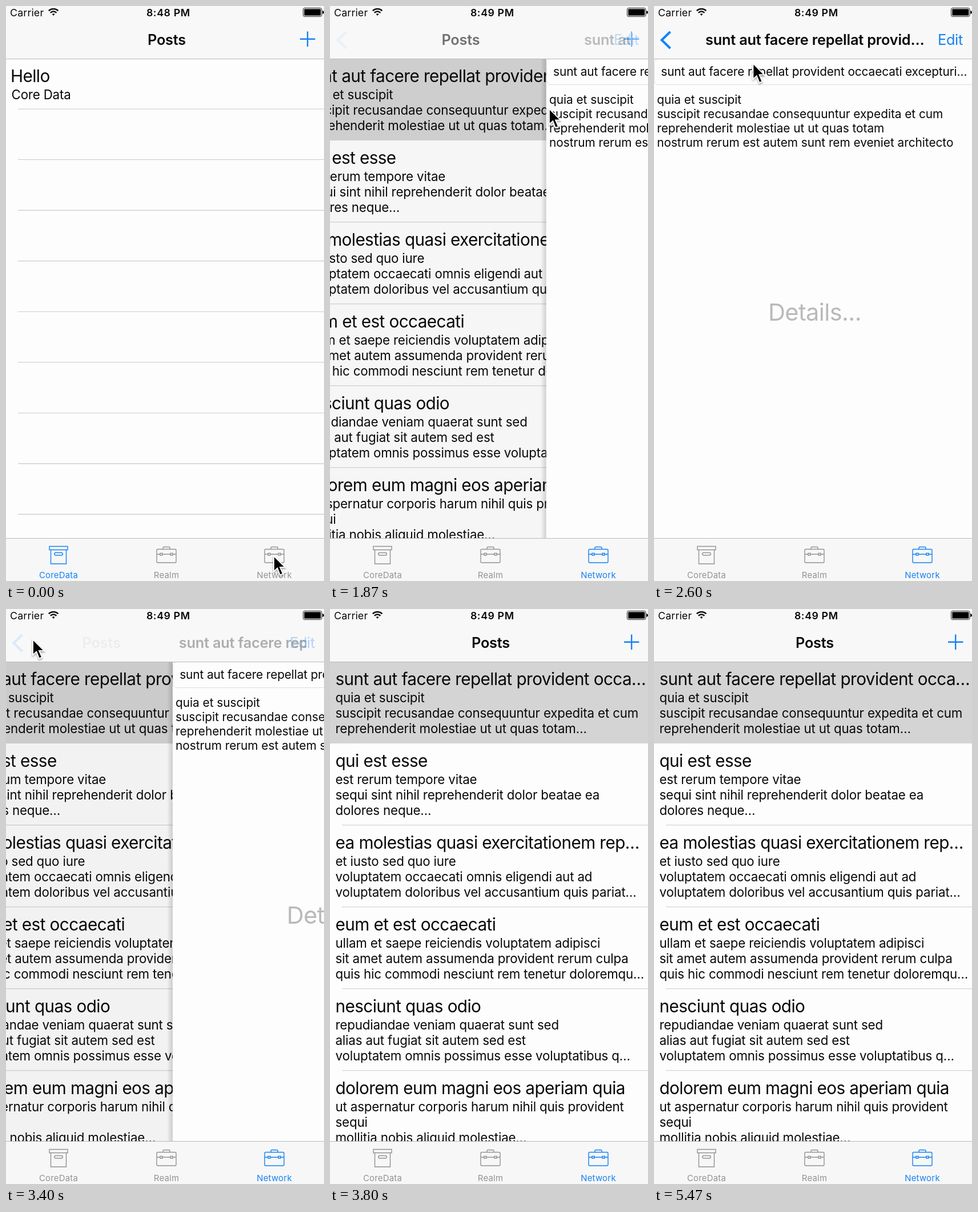
An HTML page that plays this animation: 557x1005 px, repeating every 5.54 s.

```html
<!DOCTYPE html>
<html lang="en">
<head>
<meta charset="utf-8">
<title>Posts</title>
<style>
  html, body { margin: 0; width: 100%; height: 100%; overflow: hidden; background: #fdfdfd; }
  svg { display: block; width: 100%; height: 100%; }
  text { font-family: Inter, "Open Sans", sans-serif; font-optical-sizing: none; fill: #080808; white-space: pre; }
  .title { font-size: 29.7px; letter-spacing: -.58px; }
  .body { font-size: 22.3px; letter-spacing: -.16px; }
  .field { font-size: 20.8px; letter-spacing: -.11px; }
  .note { font-size: 20.8px; letter-spacing: -.02px; }
  .hint { font-size: 41.5px; letter-spacing: -.6px; fill: #b9b9bb; }
  .nav { font-size: 25.3px; font-weight: 600; letter-spacing: -.2px; }
  .action { font-size: 25.3px; letter-spacing: -.3px; fill: #1482f5; }
  .status { font-size: 17.8px; letter-spacing: .15px; }
  .clock { font-weight: 600; letter-spacing: .6px; }
  .tab { color: #939393; }
  .tab.on { color: #1482f5; }
  .tab text { font-size: 14.9px; letter-spacing: .25px; fill: currentColor; }
  .tab path { fill: none; stroke: currentColor; stroke-width: 1.4; }
  .line { stroke: #c9c9ce; stroke-width: 1.1; }
  .edge { stroke: #b9b9b9; stroke-width: 1.1; }
  .blue { fill: none; stroke: #1482f5; }
  .middle { text-anchor: middle; }
</style>
</head>
<body>
<svg viewBox="0 0 557 1005" preserveAspectRatio="none">
  <defs>
    <linearGradient id="shade">
      <stop offset="0" stop-opacity="0"/>
      <stop offset="1" stop-opacity=".16"/>
    </linearGradient>
    <filter id="soft" x="-50%" y="-50%" width="200%" height="200%">
      <feDropShadow dx="0" dy="2" stdDeviation="1.8" flood-opacity=".4"/>
    </filter>
    <clipPath id="titleClip"><rect y="30" width="526" height="60"/></clipPath>
  </defs>
  <rect width="557" height="1005" fill="#fdfdfd"/>

  <g id="local"></g>
  <g id="list">
    <rect id="selection" y="92" width="557" height="143" fill="#d4d4d4"/>
  </g>
  <rect id="dim" y="92" width="557" height="840"/>

  <g id="detail">
    <rect x="-10" y="92" width="10" height="840" fill="url(#shade)"/>
    <rect y="92" width="557" height="840" fill="#fdfdfd"/>
    <rect x=".5" y="92.5" width="562" height="45" rx="7" fill="#fdfdfd" stroke="#dedede"/>
    <text class="hint middle" x="281.5" y="550">Details...</text>
  </g>

  <rect width="557" height="92" fill="#f8f8f8"/>
  <path class="edge" d="M0 92.5H557"/>
  <text class="status" x="7" y="17.5">Carrier</text>
  <g fill="none" stroke="#111" stroke-width="2.5">
    <path d="M74.8 8.4A12 12 0 0 1 91.4 8.4M77.8 11.8A7.5 7.5 0 0 1 88.4 11.8"/>
    <path d="M80.6 14L83.1 17L85.6 14Q83.1 12.4 80.6 14Z" fill="#111" stroke="none"/>
  </g>
  <text id="clock" class="status clock middle" x="284.3" y="17.5"></text>
  <rect x="520.5" y="3.5" width="32.5" height="15" rx="2.5" fill="none" stroke="#222"/>
  <rect x="522.3" y="5.3" width="29" height="11.4" rx="1"/>
  <path d="M554.3 8Q557 8.5 557 11T554.3 14Z"/>

  <text id="posts" class="nav middle" y="68">Posts</text>
  <path id="plus" class="blue" stroke-width="2.4" d="M515 57.8H541.5M528.2 44.5V71"/>
  <g clip-path="url(#titleClip)"><text id="heading" class="nav" y="68">sunt aut facere repellat provid…</text></g>
  <path id="back" class="blue" stroke-width="4" d="M28.5 45L13.5 59.5L28.5 74"/>
  <text id="edit" class="action" x="497" y="68">Edit</text>

  <rect y="930" width="557" height="75" fill="#f7f7f7"/>
  <path class="edge" d="M0 930.5H557"/>
  <g id="tabs"></g>
  <path id="cursor" filter="url(#soft)" stroke="#fff" stroke-width="1.8"
    d="M0 0V27.5L6.3 21.5L11 33.5L16 31.4L11 19.8H19.8Z"/>
</svg>
<script>
const LOOP = 5540, FPS = 15, WIDTH = 557;
const OPEN_TAB = 350, SELECT = 1730, PUSH = 1793.5, POP = 3291, SLIDE = 500, NAV_LAG = 13;
const ROW = 143, TOP = 92, INSET = 9.5;

const posts = [
  ['sunt aut facere repellat provident occa…', 'quia et suscipit',
    'suscipit recusandae consequuntur expedita et cum', 'reprehenderit molestiae ut ut quas totam…'],
  ['qui est esse', 'est rerum tempore vitae',
    'sequi sint nihil reprehenderit dolor beatae ea', 'dolores neque…'],
  ['ea molestias quasi exercitationem rep…', 'et iusto sed quo iure',
    'voluptatem occaecati omnis eligendi aut ad', 'voluptatem doloribus vel accusantium quis pariat…'],
  ['eum et est occaecati', 'ullam et saepe reiciendis voluptatem adipisci',
    'sit amet autem assumenda provident rerum culpa', 'quis hic commodi nesciunt rem tenetur doloremqu…'],
  ['nesciunt quas odio', 'repudiandae veniam quaerat sunt sed',
    'alias aut fugiat sit autem sed est', 'voluptatem omnis possimus esse voluptatibus q…'],
  ['dolorem eum magni eos aperiam quia', 'ut aspernatur corporis harum nihil quis provident',
    'sequi', 'mollitia nobis aliquid molestiae…'],
];
const detailLines = ['quia et suscipit', 'suscipit recusandae consequuntur expedita et cum',
  'reprehenderit molestiae ut ut quas totam', 'nostrum rerum est autem sunt rem eveniet architecto'];

const boxIcon = 'M-16 944.5H16V950.5H-16ZM-13.5 950.5V975H13.5V950.5' +
  'M-5 955.5H5A2.2 2.2 0 0 1 5 960H-5A2.2 2.2 0 0 1 -5 955.5Z';
const caseIcon = 'M-15 949.5H15Q17 949.5 17 951.5V971Q17 973 15 973H-15Q-17 973 -17 971V951.5Q-17 949.5 -15 949.5Z' +
  'M-6 949.5V947Q-6 945.5 -4.5 945.5H4.5Q6 945.5 6 947V949.5' +
  'M-17 958.2H-11M-7 958.2H7M11 958.2H17M-11 956.5H-7V960H-11ZM7 956.5H11V960H7Z';

const el = id => document.getElementById(id);

function add(parent, name, attributes, content = '') {
  const node = document.createElementNS('http://www.w3.org/2000/svg', name);
  for (const key in attributes) node.setAttribute(key, attributes[key]);
  node.textContent = content;
  return parent.appendChild(node);
}
const addText = (parent, style, x, y, content) => add(parent, 'text', { class: style, x, y }, content);
const addLine = (parent, y) => add(parent, 'path', { class: 'line', d: `M21 ${y}H${WIDTH}` });

addText(el('local'), 'title', 8, 133, 'Hello');
addText(el('local'), 'body', INSET, 163, 'Core Data');
for (let i = 0; i < 9; i++) addLine(el('local'), 180 + 88.55 * i);

const dividers = posts.map(([title, ...lines], i) => {
  const y = TOP + ROW * i;
  addText(el('list'), 'title', INSET, y + 41, title);
  lines.forEach((line, n) => addText(el('list'), 'body', INSET, y + 71 + 26.8 * n, line));
  return addLine(el('list'), y + ROW - 0.3);
});

addText(el('detail'), 'field', 12.3, 122.3, 'sunt aut facere repellat provident occaecati excepturi…');
detailLines.forEach((line, n) => addText(el('detail'), 'note', 5.2, 170.5 + 25.2 * n, line));

const tabs = [['CoreData', boxIcon], ['Realm', caseIcon], ['Network', caseIcon]].map(([label, icon], i) => {
  const tab = add(el('tabs'), 'g', { transform: `translate(${92 + 189 * i} 0)` });
  add(tab, 'path', { d: icon });
  addText(tab, 'middle', 0, 999.5, label);
  return tab;
});

const clamp = x => Math.min(1, Math.max(0, x));
const smooth = x => x * x * (3 - 2 * x);
const bezier = (a, b, u) => 3 * a * u * (1 - u) ** 2 + 3 * b * u * u * (1 - u) + u ** 3;

// Fast start, long settle: cubic-bezier(.38, .7, .125, 1)
function slide(t, start) {
  const x = clamp((t - start) / SLIDE);
  let low = 0, high = 1;
  for (let i = 0; i < 24; i++) {
    const mid = (low + high) / 2;
    if (bezier(.38, .125, mid) < x) low = mid; else high = mid;
  }
  return x === 0 || x === 1 ? x : bezier(.7, 1, low);
}

// Each move: start, end, destination
const moves = [[550, 1150, 384, 179.5], [2200, 2885, 47, 53], [3430, 3630, -40, 42]];
function cursorAt(t) {
  let x = 469, y = 961;
  for (const [start, end, toX, toY] of moves) {
    const k = smooth(clamp((t - start) / (end - start)));
    x += (toX - x) * k;
    y += (toY - y) * k;
  }
  return `translate(${x} ${y})`;
}

const move = (id, x) => el(id).setAttribute('transform', `translate(${x} 0)`);
const fade = (id, opacity) => el(id).setAttribute('opacity', opacity);
const show = (node, visible) => node.setAttribute('visibility', visible ? 'visible' : 'hidden');

function render(t) {
  const network = t >= OPEN_TAB, selected = t >= SELECT, popping = t >= POP;
  show(el('local'), !network);
  show(el('list'), network);
  show(el('selection'), selected);
  show(dividers[0], network && !selected);
  tabs.forEach((tab, i) => tab.setAttribute('class', i === (network ? 2 : 0) ? 'tab on' : 'tab'));
  el('clock').textContent = network ? '8:49 PM' : '8:48 PM';

  const page = slide(t, PUSH) - slide(t, POP);
  move('list', -WIDTH * .31 * page);
  fade('dim', .09 * page);
  move('detail', WIDTH * (1 - page));
  show(el('detail'), page > 0);

  const step = slide(t, (popping ? POP : PUSH) + NAV_LAG);
  const shown = popping ? 1 - step : step;
  const leaving = (1 - step) ** 2;
  move('posts', 281.5 - 207 * shown);
  move('heading', 90 + 476 * (1 - shown));
  fade('posts', popping ? step ** 4 : leaving);
  fade('plus', popping ? step ** 5 : leaving);
  fade('heading', popping ? leaving : step);
  fade('edit', popping ? leaving : step);
  fade('back', popping ? (1 - step) ** 3.5 : step ** 2);

  el('cursor').setAttribute('transform', cursorAt(t));
}

function tick(now) {
  const frame = Math.floor((now % LOOP + 4) * FPS / 1000);
  render(Math.min(frame, 82) * 1000 / FPS);
  requestAnimationFrame(tick);
}
render(0);
requestAnimationFrame(tick);
</script>
</body>
</html>
```
